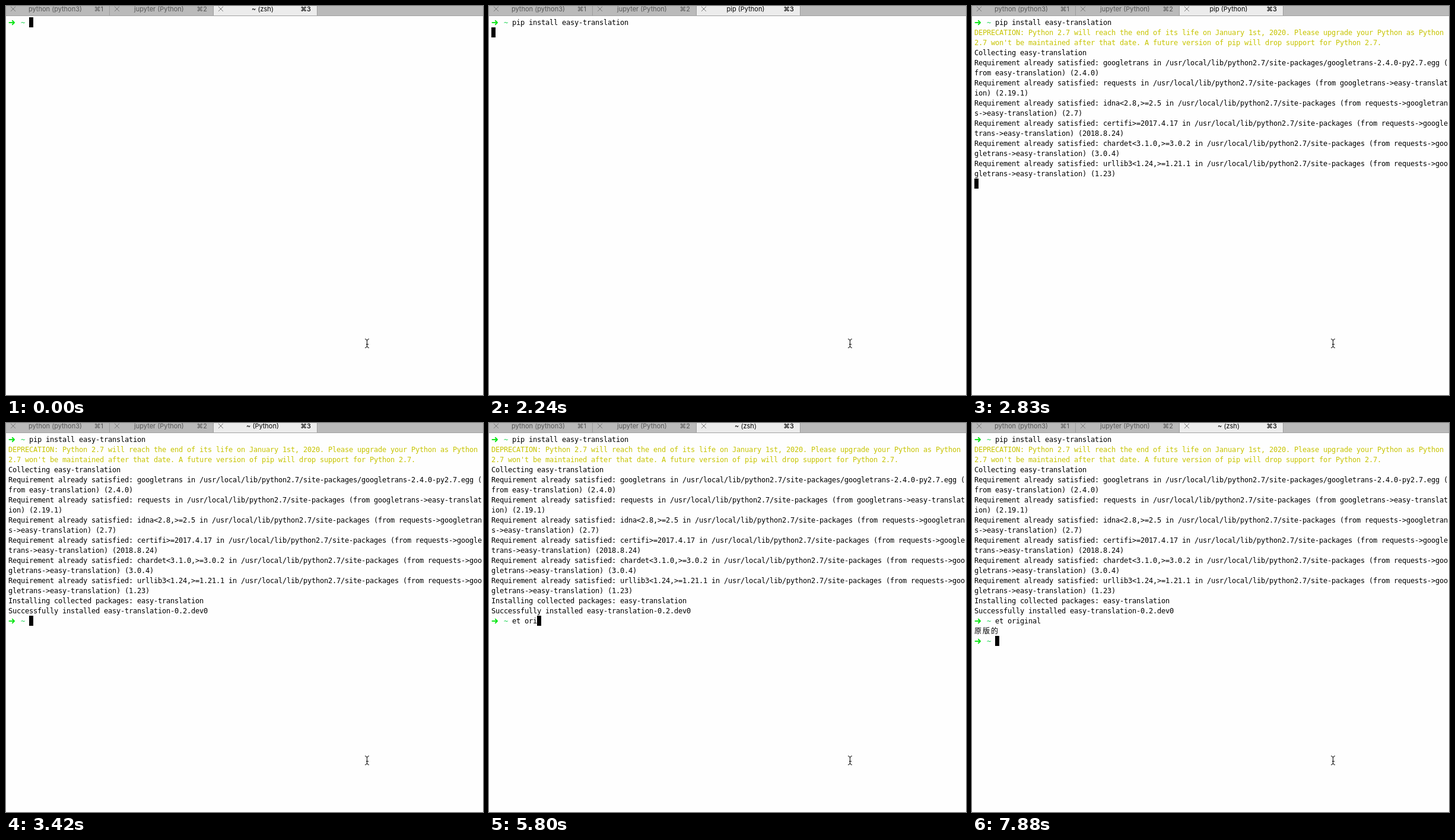
An HTML page with a canvas that plays this animation: 804 by 656 pixels, repeating every 8000 ms.

```html
<!DOCTYPE html>
<html lang="en">
<head>
<meta charset="utf-8">
<title>Terminal session</title>
<style>
  html, body { margin: 0; width: 100%; height: 100%; overflow: hidden; background: #fefefe; }
  canvas { display: block; width: 804px; height: 656px; }
</style>
</head>
<body>
<canvas id="stage" width="804" height="656"></canvas>
<script>
const ctx = document.getElementById('stage').getContext('2d');
const LOOP = 8000;
const COLS = 114, CELL_W = 7, CELL_H = 17, LEFT = 4, TOP = 19;
const PROMPT_COLS = 5;
const MONO = '12px "DejaVu Sans Mono", "Noto Sans CJK SC", "Noto Sans CJK", monospace';
const UI = '11px Inter, "DejaVu Sans", sans-serif';
const PAPER = '#fefefe', INK = '#000', YELLOW = '#c7c400', ARROW = '#12e61c', TILDE = '#10d048';

const INSTALL = 'pip install easy-translation';
const QUERY = 'et original';
const SITE = '/usr/local/lib/python2.7/site-packages';
const need = (spec, path, from, version) =>
  `Requirement already satisfied: ${spec} in ${path} (from ${from}easy-translation) (${version})`;
const VIA = 'requests->googletrans->';

const wrap = text => text.match(new RegExp(`.{1,${COLS}}`, 'g'));

const deprecation = wrap('DEPRECATION: Python 2.7 will reach the end of its life on January 1st, 2020. ' +
  'Please upgrade your Python as Python 2.7 won\'t be maintained after that date. ' +
  'A future version of pip will drop support for Python 2.7.');
const requirements = [
  need('googletrans', SITE + '/googletrans-2.4.0-py2.7.egg', '', '2.4.0'),
  need('requests', SITE, 'googletrans->', '2.19.1'),
  need('idna<2.8,>=2.5', SITE, VIA, '2.7'),
  need('certifi>=2017.4.17', SITE, VIA, '2018.8.24'),
  need('chardet<3.1.0,>=3.0.2', SITE, VIA, '3.0.4'),
  need('urllib3<1.24,>=1.21.1', SITE, VIA, '1.23')
].flatMap(wrap);

// Output rows below the first prompt, with the time each appears.
const output = [
  ...deprecation.map(text => ({ at: 2540, text, color: YELLOW })),
  { at: 2680, text: 'Collecting easy-translation' },
  ...requirements.map(text => ({ at: 2830, text })),
  { at: 3280, text: 'Installing collected packages: easy-translation' },
  { at: 3280, text: 'Successfully installed easy-translation-0.2.dev0' }
];
const QUERY_ROW = output.length + 1;

const titles = [
  [0, '~ (zsh)'], [1790, 'pip (zsh)'], [2240, 'pip (Python)'], [3420, '~ (Python)'],
  [3720, '~ (zsh)'], [7440, 'et (zsh)'], [7880, '~ (zsh)']
];
// Number of typed query characters over time.
const typing = [
  [0, 0], [3870, 1], [4160, 2], [4610, 3], [5210, 4], [5660, 5],
  [5800, 6], [6400, 7], [6550, 8], [6840, 10], [6990, 11]
];
const valueAt = (steps, t) => steps.filter(([at]) => t >= at).pop()[1];

const cellX = col => LEFT + col * CELL_W;
const cellY = row => TOP + row * CELL_H;

function box(x, y, w, h, color) {
  ctx.fillStyle = color;
  ctx.fillRect(x, y, w, h);
}

function line(points, color, width) {
  ctx.strokeStyle = color;
  ctx.lineWidth = width;
  ctx.beginPath();
  points.forEach(([x, y]) => ctx.lineTo(x, y));
  ctx.stroke();
}

function print(text, row, col = 0, color = INK) {
  ctx.font = MONO;
  ctx.textAlign = 'left';
  ctx.fillStyle = color;
  for (const ch of text) {
    ctx.fillText(ch, cellX(col), cellY(row) + 13);
    col += ch > '\u2e80' ? 2 : 1;
  }
}

function cursor(row, col = 0, cells = 1) {
  box(cellX(col), cellY(row), CELL_W * cells, CELL_H, INK);
}

function prompt(row) {
  const y = cellY(row) + 9;
  ctx.lineCap = ctx.lineJoin = 'round';
  line([[5.5, y], [13.5, y]], ARROW, 2);
  line([[10.8, y - 3.2], [14, y], [10.8, y + 3.2]], ARROW, 2);
  ctx.lineCap = 'butt';
  print('~', row, 3, TILDE);
}

function label(text, x, align, color, weight = 400) {
  ctx.font = `${weight} ${UI}`;
  ctx.textAlign = align;
  ctx.fillStyle = color;
  ctx.fillText(text, x, 9);
}

function tabs(t) {
  box(0, 0, 804, 16, '#bababa');
  box(350, 0, 174, 16, '#ececec');
  box(0, 16, 804, 1, '#a2a2a2');
  ['python (python3)', 'jupyter (Python)', valueAt(titles, t)].forEach((title, i) => {
    const x = i * 175, active = i === 2;
    const color = active ? INK : '#555';
    box(x + 174, 0, 1, 16, '#9c9c9c');
    line([[x + 8, 1], [x + 16, 9]], '#777', 1);
    line([[x + 16, 1], [x + 8, 9]], '#777', 1);
    label(title, x + (active ? 82.5 : 83), 'center', color);
    label('⌘' + (i + 1), x + 164, 'right', color, active ? 500 : 400);
  });
}

function pointer() {
  const x = 608.5;
  ctx.strokeStyle = INK;
  ctx.lineWidth = 1;
  ctx.beginPath();
  for (const side of [-1, 1]) {
    ctx.moveTo(x + side * 3.5, 561.5);
    ctx.quadraticCurveTo(x, 561.5, x, 565);
    ctx.lineTo(x, 573);
    ctx.quadraticCurveTo(x, 576.5, x + side * 3.5, 576.5);
  }
  ctx.moveTo(x - 1.5, 570.5);
  ctx.lineTo(x + 2.5, 570.5);
  ctx.stroke();
}

function terminal(t) {
  prompt(0);
  if (t < 1790) {
    const pasted = t < 900 ? '' : INSTALL;
    cursor(0, PROMPT_COLS, pasted.length + 1);
    print(pasted, 0, PROMPT_COLS, PAPER);
    return;
  }
  print(INSTALL, 0, PROMPT_COLS);

  const shown = output.filter(({ at }) => t >= at);
  shown.forEach(({ text, color }, i) => print(text, i + 1, 0, color));
  if (t < 3420) {
    cursor(shown.length + 1);
    return;
  }

  const count = valueAt(typing, t);
  prompt(QUERY_ROW);
  print(QUERY.slice(0, count), QUERY_ROW, PROMPT_COLS);
  if (t < 7440) {
    cursor(QUERY_ROW, PROMPT_COLS + count);
  } else if (t < 7880) {
    cursor(QUERY_ROW + 1);
  } else {
    print('原版的', QUERY_ROW + 1);
    prompt(QUERY_ROW + 2);
    cursor(QUERY_ROW + 2, PROMPT_COLS);
  }
}

let start;
function draw(now) {
  start ??= now;
  const t = (now - start) % LOOP;
  box(0, 0, 804, 656, PAPER);
  tabs(t);
  terminal(t);
  pointer();
  requestAnimationFrame(draw);
}
requestAnimationFrame(draw);
</script>
</body>
</html>
```
